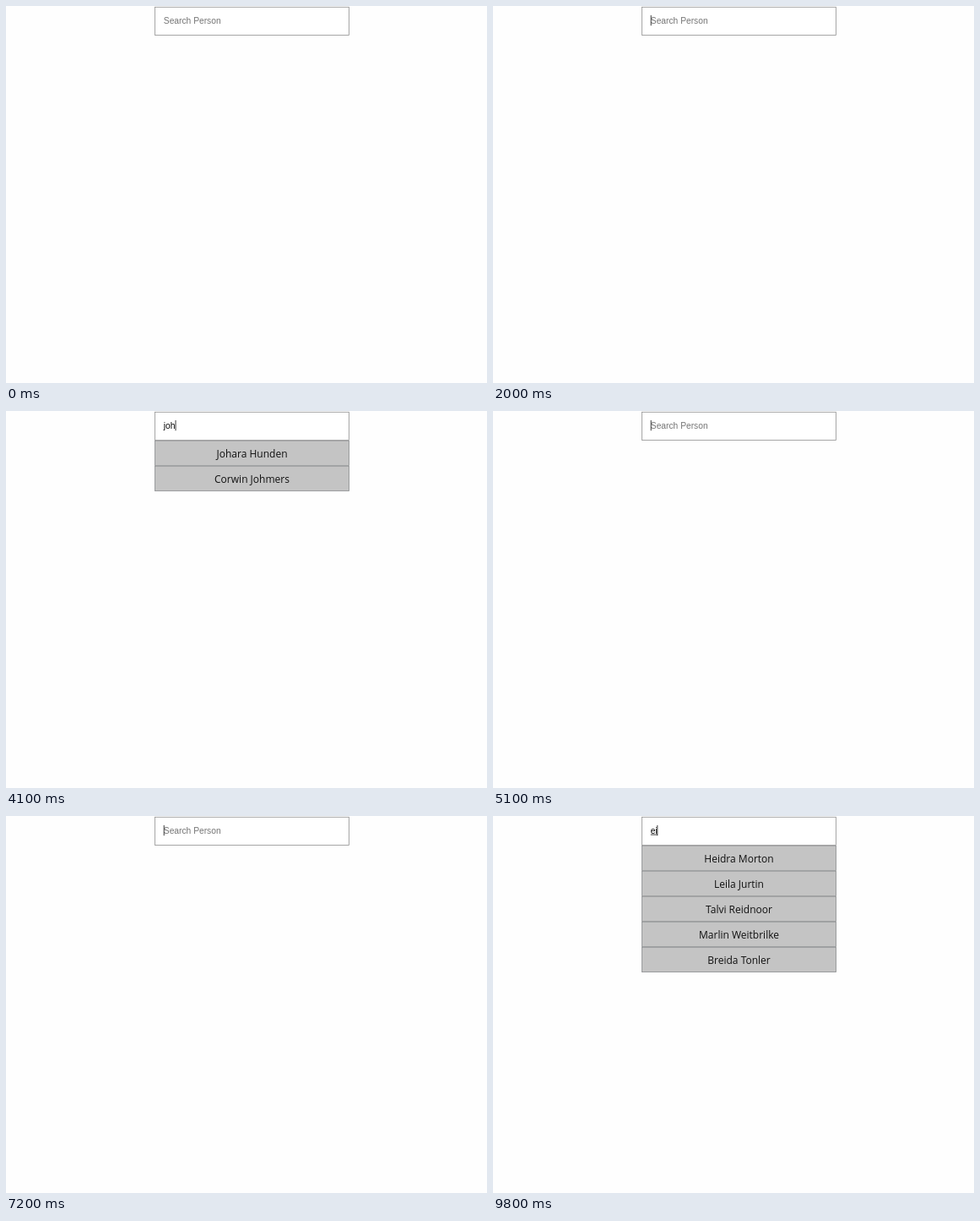
These frames come from a looping animation (570 px wide and 446 px high, 10 s). An HTML page:

```html
<!DOCTYPE html>
<html lang="en">
<head>
<meta charset="utf-8">
<title>Person search</title>
<style>
  html, body { margin: 0; width: 100%; height: 100%; overflow: hidden; background: #fefefe; }
  /* laid out at 300px wide, shown zoomed out */
  #search {
    position: absolute; left: 0; top: 0; width: 300px;
    transform: translate(176px, .9px) scale(.77); transform-origin: 0 0;
  }
  #field {
    position: relative; height: 43.5px; box-sizing: border-box; padding-left: 13px;
    border: 1px solid #8c8c8c; background: #fff;
    font: 13.33px/41px "Liberation Sans", Arial, sans-serif; white-space: pre;
  }
  #field.empty { color: #757575; }
  #field.marked #text { text-decoration: underline; }
  #caret { position: absolute; top: 12px; width: 1.3px; height: 15.6px; background: #000; }
  #list div {
    height: 39px; box-sizing: border-box; border: 1px solid #8e9092; background: #c4c4c4;
    color: #111; font: 15.6px/39px "Open Sans", "Noto Sans", sans-serif; text-align: center;
  }
</style>
</head>
<body>
<div id="search">
  <div id="field"><span id="text"></span><i id="caret"></i></div>
  <div id="list"></div>
</div>
<script>
const LOOP = 10000, MAX_ROWS = 10;
const people = [
  "Heidra Morton", "Johara Hunden", "Leila Jurtin", "Joslin Marrable", "Talvi Reidnoor",
  "Jorby Pemwick", "Judiella Triff", "Corwin Johmers", "Marlin Weitbrilke", "Joss Tervil",
  "Jocelyn Hartop", "Breida Tonler", "Odell Joblin", "Jolene Brisk"
];

// start time, typed query, caret visible
const steps = [
  [0, "", 0], [600, "", 1], [1200, "", 0],
  [1500, "j", 1], [2000, "", 1], [2100, "", 0],
  [2400, "j", 1], [2600, "jo", 1], [2900, "joh", 1], [3500, "joh", 0], [4000, "joh", 1],
  [4400, "jo", 1], [4600, "j", 1], [5100, "", 1],
  [5700, "j", 1], [5900, "ju", 1], [6500, "ju", 0], [6900, "j", 1], [7200, "", 1],
  [7500, "e", 1], [7700, "ei", 1], [8300, "ei", 0], [8800, "ei", 1], [9300, "ei", 0], [9800, "ei", 1]
];

const [field, text, caret, list] = ["field", "text", "caret", "list"].map(id => document.getElementById(id));
let shown;

function show(step) {
  const [, query, blink] = step;
  field.className = query === "" ? "empty" : query === "ei" ? "marked" : "";
  text.textContent = query || "Search Person";
  caret.style.left = 13 + (query ? text.offsetWidth : 0) + "px";
  caret.style.visibility = blink ? "visible" : "hidden";
  const found = query ? people.filter(name => name.toLowerCase().includes(query)) : [];
  list.replaceChildren(...found.slice(0, MAX_ROWS).map(name => {
    const row = document.createElement("div");
    row.textContent = name;
    return row;
  }));
}

const start = performance.now();
function frame() {
  const t = (performance.now() - start) % LOOP;
  const step = steps.findLast(([from]) => from <= t);
  if (step !== shown) show(shown = step);
  requestAnimationFrame(frame);
}
frame();
</script>
</body>
</html>
```
